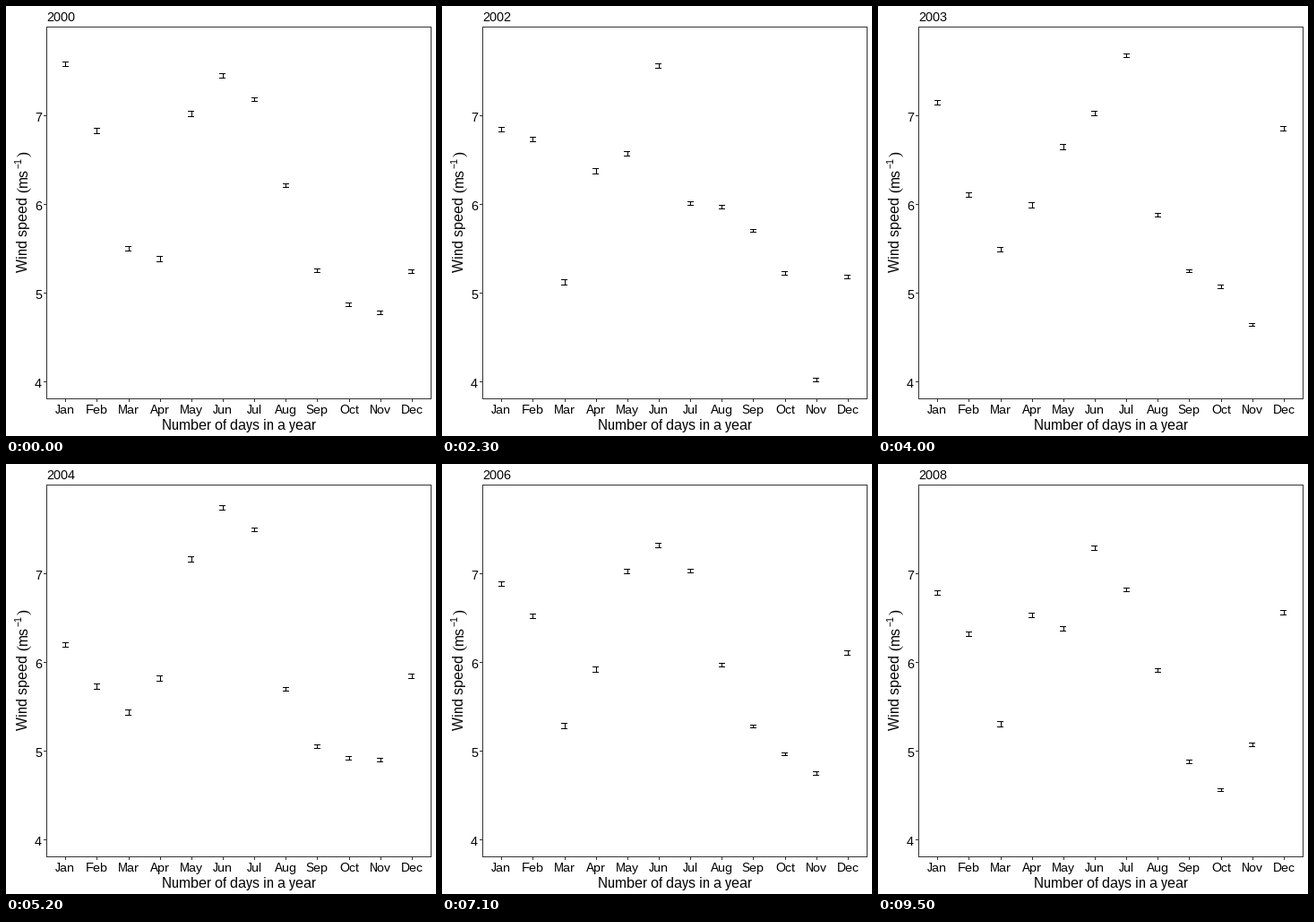
Recreate the animation shown at these times as a matplotlib script. Size 480x480 px, loop 10 s.

```python
import matplotlib.pyplot as plt
import numpy as np
from matplotlib.animation import FuncAnimation
from matplotlib.collections import PolyCollection

# Whole-pixel glyph hinting
plt.rcParams.update({"text.hinting": "native", "text.hinting_factor": 1})

SIZE, DPI = 480, 80
FRAMES, INTERVAL = 100, 100
FIRST_HOLD, CYCLE, STEPS = 4, 12, 8
LEFT, TOP, RIGHT, BOTTOM = 45, 23, 474, 438
UNIT, Y_AT_4 = 99, 419
MONTHS = "Jan Feb Mar Apr May Jun Jul Aug Sep Oct Nov Dec".split()
YEARS = range(2000, 2009)
MONTH = np.arange(12)
CENTERS = 66.2 + 35.155 * MONTH
FRAME_COLOR = "#333333"

# Mean monthly wind speed in m/s; years left out follow the average season
SPEEDS = {
    2000: [7.58, 6.83, 5.50, 5.38, 7.02, 7.45, 7.18, 6.21, 5.25, 4.87, 4.78, 5.24],
    2002: [6.84, 6.73, 5.12, 6.37, 6.57, 7.56, 6.01, 5.97, 5.70, 5.22, 4.02, 5.18],
    2003: [7.15, 6.11, 5.49, 5.99, 6.64, 7.02, 7.68, 5.88, 5.25, 5.07, 4.64, 6.86],
    2004: [6.20, 5.72, 5.44, 5.82, 7.16, 7.75, 7.50, 5.70, 5.05, 4.92, 4.90, 5.84],
    2005: [6.37, 6.75, 5.10, 5.84, 7.65, 6.71, 7.23, 5.70, 4.98, 5.07, 4.97, 6.33],
    2007: [7.28, 7.19, 5.02, 5.51, 7.74, 7.48, 6.81, 6.41, 5.83, 5.06, 4.83, 6.74],
    2008: [6.78, 6.32, 5.30, 6.53, 6.38, 7.29, 6.82, 5.91, 4.88, 4.56, 5.07, 6.56],
}
SEASON = np.mean(list(SPEEDS.values()), axis=0)
STATES = [np.array(SPEEDS.get(year, SEASON)) for year in YEARS]

# Standard error in m/s: widest in spring, narrowest in autumn
ERRORS = 0.0235 + 0.006 * np.cos(2 * np.pi * (MONTH - 2.5) / 12)

fig = plt.figure(figsize=(SIZE / DPI, SIZE / DPI), dpi=DPI, facecolor="white")
ax = fig.add_axes([0, 0, 1, 1])
ax.set_xlim(0, SIZE)
ax.set_ylim(SIZE, 0)
ax.axis("off")


def near(value):
    return int(np.floor(value + 0.5))


def y_pixel(speed):
    return Y_AT_4 - UNIT * (speed - 4)


def ease(t):
    return 4 * t ** 3 if t < 0.5 else 1 - 4 * (1 - t) ** 3


def box(x0, y0, x1, y1):
    """Rectangle covering the pixels x0..x1 by y0..y1 inclusive."""
    return [(x0, y0), (x1 + 1, y0), (x1 + 1, y1 + 1), (x0, y1 + 1)]


def add_boxes(boxes, color):
    return ax.add_collection(PolyCollection(
        boxes, facecolors=color, edgecolors="none", linewidths=0, antialiaseds=False))


def label(x, y, text, size=14, ha="left", rotation=0, family="Liberation Sans"):
    return ax.text(x, y, text, fontsize=size * 72 / DPI, family=family, ha=ha,
                   va="baseline", rotation=rotation, rotation_mode="anchor")


def error_bars(speeds):
    boxes = []
    for x, speed, error in zip(CENTERS, speeds, ERRORS):
        y0, y1 = near(y_pixel(speed + error)), near(y_pixel(speed - error))
        x0, x1, mid = near(x - 3.5), near(x + 3.5) - 1, near(x)
        boxes += [box(x0, y0, x1, y0), box(x0, y1, x1, y1), box(mid, y0, mid, y1)]
    return boxes


# Panel border and ticks
panel = [box(LEFT, TOP, RIGHT, TOP), box(LEFT, BOTTOM, RIGHT, BOTTOM),
         box(LEFT, TOP, LEFT, BOTTOM), box(RIGHT, TOP, RIGHT, BOTTOM)]
for x, month in zip(CENTERS, MONTHS):
    panel.append(box(near(x), BOTTOM + 1, near(x), BOTTOM + 3))
    label(near(x), 455, month, ha="center")
for speed in range(4, 8):
    y = y_pixel(speed)
    panel.append(box(LEFT - 3, y, LEFT - 1, y))
    label(40, y + 7, str(speed), ha="right")
add_boxes(panel, FRAME_COLOR)

# Axis titles
label(260, 473, "Number of days in a year", 16, ha="center")
label(24, 297, "Wind speed", 16, rotation=90)
label(24, 202, "ms", 16, rotation=90)
label(17, 181, "\u22121", 11, rotation=90)
for y, bracket in [(208, "("), (168, ")")]:
    label(24, y, bracket, 17, rotation=90, family="Liberation Serif")

title = label(LEFT, 17, str(YEARS[0]))
bars = add_boxes(error_bars(STATES[0]), "black")


def update(n):
    k, step = divmod(n - FIRST_HOLD, CYCLE)
    t = min((step + 1) / STEPS, 1)
    old, new = max(k, 0), k + 1
    w = ease(t)
    bars.set_verts(error_bars(STATES[old] * (1 - w) + STATES[new] * w))
    title.set_text(str(YEARS[new if t >= 0.5 else old]))
    return bars, title


anim = FuncAnimation(fig, update, frames=FRAMES, interval=INTERVAL,
                     repeat=True, repeat_delay=0, blit=False)
plt.show()
```
